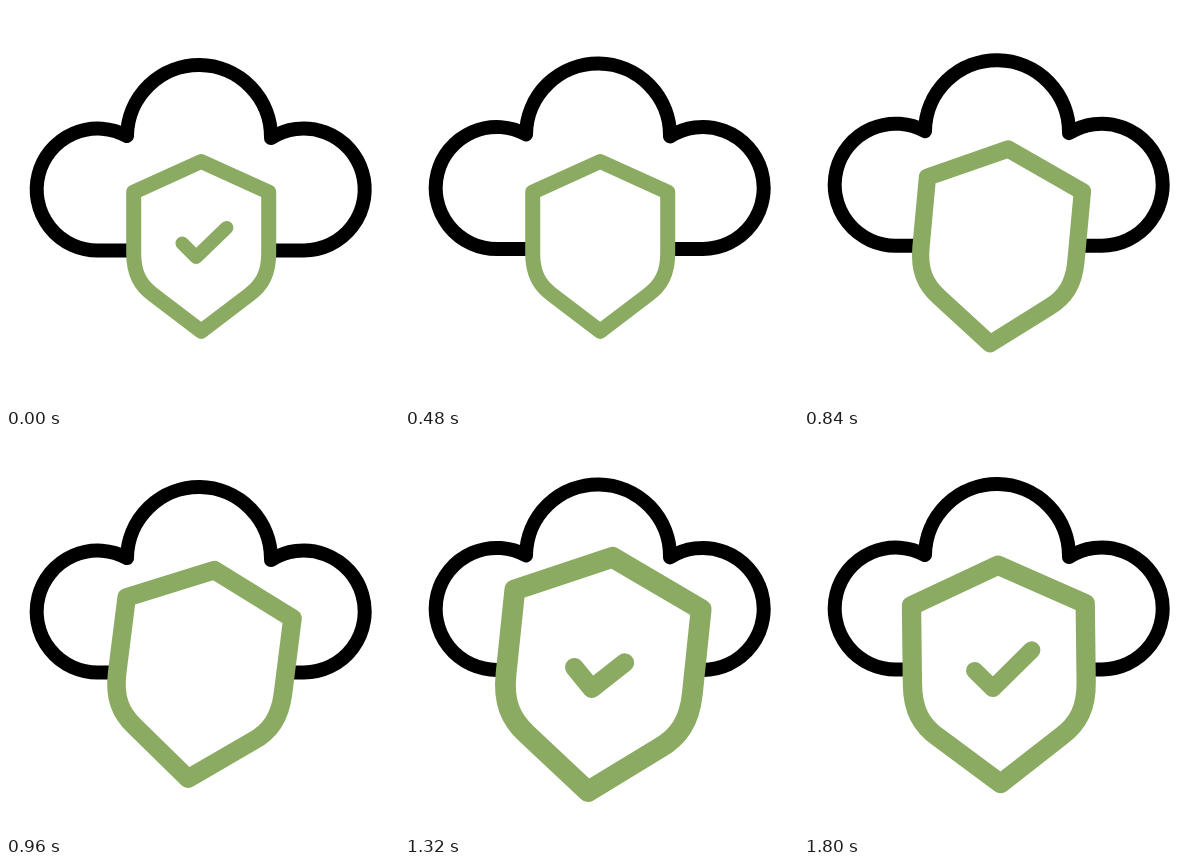
Recreate the animation shown at these times as an HTML page. Size 393 by 400 pixels, loop 1.86 s.

```html
<!DOCTYPE html>
<html lang="en">
<head>
<meta charset="utf-8">
<title>Cloud shield</title>
<style>
  html, body { margin: 0; width: 100%; height: 100%; overflow: hidden; background: #fff; }
  svg { display: block; width: 100%; height: 100%; }
  path { stroke-linecap: round; stroke-linejoin: round; }
</style>
</head>
<body>
<svg viewBox="0 0 393 400">
  <path id="cloud" fill="none" stroke="#000" stroke-width="14"
    d="M92 244.5A61 61 0 1 1 121 130A72 72 0 0 1 265 132A61 61 0 1 1 298 244.5Z"/>
  <g id="shield" stroke="#8bab62">
    <path fill="#fff" stroke-width="15"
      d="M195 155.3L262.5 186V247C262.5 267 256 279 243 288.5L195 325L147 288.5C134 279 127.5 267 127.5 247V186Z"/>
    <path id="check" fill="none" stroke-width="13.5" pathLength="1" d="M176 237L190 251L220.5 221.5"/>
  </g>
</svg>
<script>
const LOOP = 1860, STEP = 60;
const [cloud, shield, check] = ['cloud', 'shield', 'check'].map(id => document.getElementById(id));

// [time, value] keys
const SCALE = [[0, 1], [560, 1], [720, 1.07], [960, 1.238], [1140, 1.328], [1440, 1.405], [1560, 1.39], [1800, 1.287]];
const ANGLE = [[0, 0], [540, 0], [720, 2.8], [960, 7.2], [1140, 8], [1560, 1.5], [1800, -0.7]];

function ease(t, from, to) {
  const p = Math.min(1, Math.max(0, (t - from) / (to - from)));
  return p * p * (3 - 2 * p);
}

// Smooth monotone curve through the keys
function sample(keys, t) {
  const slope = i => keys[i + 1] ? (keys[i + 1][1] - keys[i][1]) / (keys[i + 1][0] - keys[i][0]) : slope(i - 1);
  const tangent = i => {
    const a = slope(Math.max(0, i - 1)), b = slope(i);
    return a * b > 0 ? 2 * a * b / (a + b) : 0;
  };
  const next = keys.findIndex(k => k[0] > t);
  if (next < 0) return keys[keys.length - 1][1];
  const i = next - 1, [t0, v0] = keys[i], [t1, v1] = keys[next];
  const d = t1 - t0, p = (t - t0) / d, q = 1 - p;
  return v0 * q * q * (1 + 2 * p) + v1 * p * p * (1 + 2 * q)
    + d * p * q * (q * tangent(i) - p * tangent(next));
}

function draw(now) {
  const t = Math.floor(now % LOOP / STEP) * STEP;
  cloud.setAttribute('transform', `translate(0 ${-9 * ease(t, 120, 1500)})`);
  shield.setAttribute('transform',
    `translate(195.2 240.2) rotate(${sample(ANGLE, t)}) scale(${sample(SCALE, t)}) translate(-195 -240)`);

  const drawn = 1 - ease(t, 0, 450) + ease(t, 990, 1450);
  check.setAttribute('stroke-dasharray', `${drawn} 2`);
  check.setAttribute('visibility', drawn > 0.001 ? 'visible' : 'hidden');
}

const start = performance.now();
function tick() {
  draw(performance.now() - start);
  requestAnimationFrame(tick);
}
tick();
</script>
</body>
</html>
```
